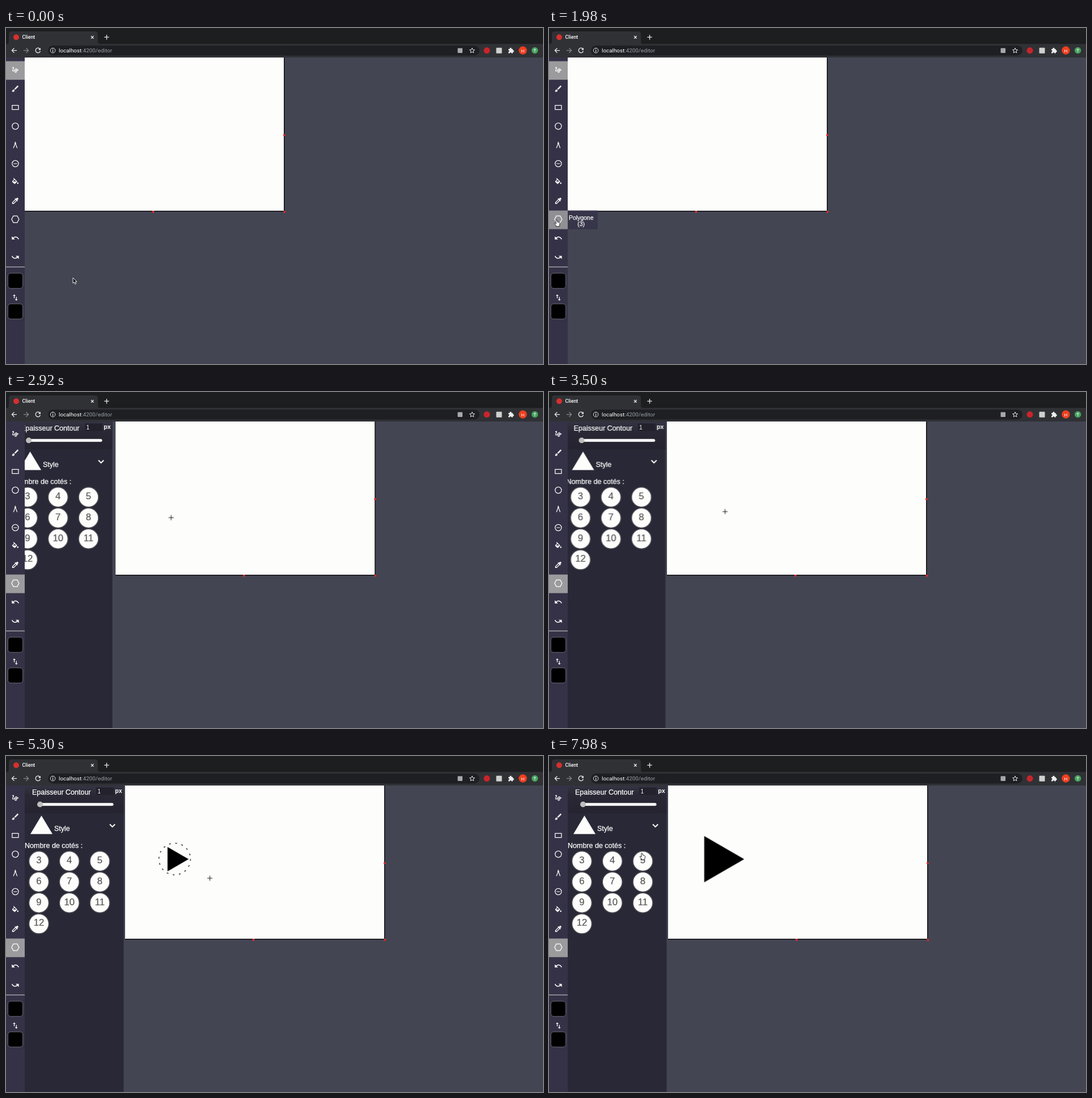
An HTML page that plays this animation: 947 by 592 pixels, repeating every 8000 ms.

```html
<!DOCTYPE html>
<html lang="fr">
<head>
<meta charset="utf-8">
<title>Client</title>
<style>
  html, body { margin: 0; width: 100%; height: 100%; overflow: hidden; background: #434553; }
  svg { display: block; width: 100%; height: 100%; }
  text { font-family: "Liberation Sans", Arial, sans-serif; fill: #fff; }
  .ui { font-family: Roboto, sans-serif; }
  .line { fill: none; stroke: #fff; stroke-width: 2; }
  .chrome { fill: none; stroke: #e8eaed; stroke-width: 1.3; }
  .thin { stroke-width: 1; }
  .off { stroke: #85878a; }
  .label, .tip { stroke: #fff; stroke-width: .25; }
  .label { font-size: 12.5px; }
  .side { font-size: 16.7px; fill: #555; stroke: #555; stroke-width: .2; text-anchor: middle; }
  .tip { font-size: 10.45px; text-anchor: middle; }
</style>
</head>
<body>
<svg viewBox="0 0 947 592" preserveAspectRatio="none">
  <defs>
    <linearGradient id="head" x2="0" y2="1">
      <stop stop-color="#353443"/><stop offset=".35" stop-color="#292834"/><stop offset="1" stop-color="#24232f"/>
    </linearGradient>
  </defs>
  <rect width="947" height="592" fill="#434553"/>

  <g id="canvas">
    <rect x="33" y="52" width="457" height="270" fill="#fdfdfc"/>
    <path d="M33 322.6H490.600V52" fill="none" stroke="#000" stroke-width="1.3"/>
    <path d="M489 187h3.4v3.4h-3.4zM257.8 322h3.4v3.4h-3.4zM489.5 322h3.4v3.4h-3.4z" fill="#e02c2c"/>
  </g>

  <path id="shape" d="M1 0L-.5 .866V-.866z"/>
  <circle id="ring" cx="297.5" cy="181.5" fill="none" stroke="#555" stroke-width="1.8" stroke-dasharray="3.2 7.8"/>

  <g id="panel">
    <rect x="-10" y="52" width="217.5" height="540" fill="#292836"/>
    <rect x="-10" y="52" width="217.5" height="49" fill="url(#head)"/>
    <rect x="159" y="55.5" width="31" height="13" fill="#22212c"/>
    <text class="label" x="46" y="67.5">Epaisseur Contour</text>
    <text x="161.5" y="65.5" font-size="10">1</text>
    <text x="192.3" y="64.8" font-size="10.7" font-weight="bold">px</text>
    <rect x="57" y="82.7" width="132.5" height="5" rx="2.5" fill="#fdfdfc"/>
    <circle cx="60" cy="85.2" r="5" fill="#bdbdbd"/>
    <path d="M62.5 105L82 137.5H43z" fill="#fdfdfc"/>
    <text class="label" x="85" y="131.5">Style</text>
    <path class="line" d="M183 120.3l4.6 4.6 4.6-4.6"/>
    <text class="label" x="33" y="161.7">Nombre de cotés :</text>
  </g>

  <g id="tooltip">
    <rect x="-20" y="321.5" width="105.8" height="33" fill="#373549"/>
    <text class="tip" x="56.7" y="337.6">Polygone</text>
    <text class="tip" x="56.7" y="349.4">(3)</text>
  </g>

  <rect y="52" width="33" height="540" fill="#353247"/>
  <rect id="firstTool" y="58.5" width="33" height="32.7" fill="#9b9a9d"/>
  <rect id="polygonTool" y="321.6" width="33" height="32.8" fill="#9b9a9d"/>
  <g id="tools"></g>
  <path d="M0 421H33" stroke="#d8d8d8" stroke-width="1.2"/>
  <g stroke="#6c6a78">
    <rect x="3.3" y="432" width="26.4" height="26.8" rx="5"/>
    <rect x="3.3" y="486" width="26.4" height="26.8" rx="5"/>
  </g>

  <rect width="947" height="28" fill="#1c1e20"/>
  <rect y="28" width="947" height="24" fill="#303135"/>
  <path d="M1 28q4 0 4-4V11q0-5 5-5h147q5 0 5 5v13q0 4 4 4z" fill="#303135"/>
  <rect x="74" y="31" width="761" height="17.4" rx="8.7" fill="#1d1f22"/>
  <circle cx="18" cy="16.2" r="5" fill="#d5302f"/>
  <text class="ui" x="28.5" y="19.4" font-size="8.8" font-weight="500">Client</text>
  <path class="chrome" d="M150 14l4.6 4.6M154.6 14l-4.6 4.6M173.3 16.2h8.4M177.5 12v8.4"/>
  <path class="chrome" d="M19 39.6h-8.5M14.5 35.5l-4.1 4.1 4.1 4.1"/>
  <path class="chrome off" d="M31 39.6h8.5M35.5 35.5l4.1 4.1-4.1 4.1"/>
  <path class="chrome" d="M60 37.2a4.2 4.2 0 1 0 .5 3.3"/>
  <path d="M61 34.8v4h-4z" fill="#e8eaed"/>
  <circle class="chrome thin" cx="82.6" cy="39.6" r="4.3"/>
  <path class="chrome" d="M82.6 39v3.2M82.6 36.8v1.2"/>
  <text class="ui" x="93" y="43" font-size="9.85">localhost<tspan fill="#9aa0a6">:4200/editor</tspan></text>
  <rect x="796.5" y="35.5" width="8.5" height="8.5" rx="1" fill="#a5a8ac"/>
  <path class="chrome thin" d="M822 35.3l1.3 2.9 3.2.3-2.4 2.1.7 3.1-2.8-1.6-2.8 1.6.7-3.1-2.4-2.1 3.2-.3z"/>
  <circle cx="848" cy="39.6" r="5.5" fill="#c9242c"/>
  <rect x="864.5" y="34.7" width="10" height="10" rx="1" fill="#cfd0cf"/>
  <path d="M886 37h2.3a1.7 1.7 0 1 1 3.2 0h2.3v2.3a1.6 1.6 0 1 1 0 3.1v2.1h-2.4a1.5 1.5 0 0 0-3 0H886v-2.4a1.5 1.5 0 0 0 0-3z" fill="#eceef0"/>
  <circle cx="911.4" cy="39.5" r="7.2" fill="#ee3f1f"/>
  <text class="ui" x="911.4" y="42.5" font-size="8" text-anchor="middle">H</text>
  <circle cx="932.6" cy="39.5" r="5.7" fill="#43a35e"/>
  <path class="chrome thin" d="M932.6 42.5v-5.5M930.2 39l2.4-2.4 2.4 2.4"/>

  <g id="cursor">
    <path id="arrow" d="M0 0v9.7l2.2-2 1.7 3.7 1.7-.8-1.6-3.5h3z" fill="#111" stroke="#fff" stroke-width=".9"/>
    <path id="hand" d="M-1.2 .6q1.2-1.4 2 .2l.8 3 3 .8q1.3.5 1 2l-.8 3.6v1.6H-.8v-1.5L-3.6 6.9q-.5-1.3 1-1.3l1.7 1.2z" fill="#fff" stroke="#111" stroke-width=".9"/>
    <path id="cross" d="M-4.5 0h9M0-4.5v9" stroke="#111" stroke-width="1"/>
  </g>
</svg>
<script>
const LOOP = 8000;
const $ = id => document.getElementById(id);
const NS = 'http://www.w3.org/2000/svg';

function add(parent, tag, attrs, text = '') {
  const el = parent.appendChild(document.createElementNS(NS, tag));
  for (const key in attrs) el.setAttribute(key, attrs[key]);
  el.textContent = text;
  return el;
}

const CIRCLE = 'M3 12a9 9 0 1 1 18 0a9 9 0 1 1-18 0z';
const UNDO = 'M12.5 8c-2.65 0-5.05.99-6.9 2.6L2 7v9h9l-3.62-3.62c1.39-1.16 3.16-1.88 5.12-1.88 3.54 0 6.55 2.31 7.6 5.5l2.37-.78C21.08 11.03 17.15 8 12.5 8z';

// Toolbar icons on a 24-unit grid: [centre y, path, class, extra transform]
const icons = [
  [74, 'M3.5 6c2-2 4.5-2.5 3.5.8s-4.3 6-2 8 5-3 7-5 5.2-1.8 5.2 1-1.8 8-4.2 8-3-3.6 0-5.4 5-1.7 8.5-1.7', 'line'],
  [107, 'M7 14c-1.66 0-3 1.34-3 3 0 1.31-1.16 2-2 2 .92 1.22 2.49 2 4 2 2.21 0 4-1.79 4-4 0-1.66-1.34-3-3-3zm13.71-9.37l-1.34-1.34a1 1 0 0 0-1.41 0L9 12.25 11.75 15l8.96-8.96a1 1 0 0 0 0-1.41z'],
  [140, 'M3 6h18v12H3z', 'line'],
  [173, CIRCLE, 'line'],
  [206, 'M12 3v3M12 6a1.6 1.6 0 1 1 0 3.2a1.6 1.6 0 1 1 0-3.2M11.3 9L6.8 21M12.7 9l4.5 12', 'line'],
  [239, CIRCLE + 'M7 12h10', 'line'],
  [270.5, 'M16.56 8.94L7.62 0 6.21 1.41l2.38 2.38-5.15 5.15c-.59.59-.59 1.54 0 2.12l5.5 5.5c.29.29.68.44 1.06.44s.77-.15 1.06-.44l5.5-5.5c.59-.58.59-1.53 0-2.12zM5.21 10L10 5.21 14.79 10zM19 11.5s-2 2.17-2 3.5c0 1.1.9 2 2 2s2-.9 2-2c0-1.33-2-3.5-2-3.5z', '', 'translate(0 2)'],
  [304.5, 'M20.71 5.63l-2.34-2.34a1 1 0 0 0-1.41 0l-3.12 3.12-1.93-1.91-1.41 1.41 1.42 1.42L3 16.25V21h4.75l8.92-8.92 1.42 1.42 1.41-1.41-1.92-1.92 3.12-3.12c.4-.4.4-1.03.01-1.42zM6.92 19L5 17.08l8.06-8.06 1.92 1.92z'],
  [337, 'M1.5 12l5-9.3h11l5 9.3-5 9.3h-11z', 'line'],
  [370, UNDO],
  [404, UNDO, '', 'rotate(180 12 12)'],
  [475, 'M9 3L5 6.99h3V14h2V6.99h3zM16 17.01V10h-2v7.01h-3L15 21l4-3.99z'],
];
for (const [y, d, kind = '', extra = ''] of icons) {
  add($('tools'), 'path', {
    d, class: kind, fill: '#fff',
    transform: `translate(16.4 ${y}) scale(.62) translate(-12 -12) ${extra}`,
  });
}

// Side-count buttons
for (let n = 3; n <= 12; n++) {
  const x = 58 + (n % 3) * 53.75, y = 185.2 + (Math.floor(n / 3) - 1) * 36.8;
  add($('panel'), 'circle', { cx: x, cy: y, r: 17.4, fill: '#fdfdfc', stroke: '#525157', 'stroke-width': 1.4 });
  add($('panel'), 'text', { class: 'side', x, y: y + 3.8 }, n);
}

// steps: [time, value, easing towards the next step]
function play(id, prop, steps, format = v => v) {
  const all = [[0, steps[0][1]], ...steps, [LOOP, steps.at(-1)[1]]];
  $(id).animate(
    all.map(([t, v, easing = 'linear']) => ({ offset: t / LOOP, [prop]: format(v), easing })),
    { duration: LOOP, iterations: Infinity });
}
const shift = x => `translate(${x}px, 0px)`;
const at = ([x, y]) => `translate(${x}px, ${y}px)`;
const HOLD = 'steps(1, end)';
const SWIFT = 'cubic-bezier(.25, .8, .25, 1)';
const show = (id, ...steps) => play(id, 'opacity', steps.map(([t, v]) => [t, v, HOLD]));

play('canvas', 'transform', [[2078, 0, SWIFT], [4005, 177]], shift);
play('panel', 'transform', [[2156, -175, SWIFT], [4036, 0]], shift);
play('tooltip', 'transform', [[960, -53, SWIFT], [1310, 0], [2480, 0, 'ease-in'], [2800, -53]], shift);
play('firstTool', 'opacity', [[2080, 1, 'ease-out'], [2520, 0]]);
play('polygonTool', 'opacity', [[960, 0], [1120, 0.9], [2080, 0.9], [2300, 1]]);

play('shape', 'transform', [[4880, 0], [5300, 24.7], [5700, 47]],
  r => `translate(297.2px, 181.7px) scale(${r})`);
play('ring', 'r', [[4880, 0], [5300, 27.8], [5700, 50]], r => r + 'px');
show('ring', [0, 0], [4880, 1], [5760, 0]);

play('cursor', 'transform', [
  [250, [118, 440], 'ease-in'], [840, [92, 418]], [1020, [18, 346], 'ease-out'], [1120, [13.5, 338]],
  [2090, [13.5, 338], 'ease-in-out'], [2400, [202.5, 258.7], 'ease-out'], [2900, [290, 222], 'ease-out'],
  [3500, [310.5, 210.7], 'ease-in-out'], [4300, [297.5, 182]], [4850, [297.5, 182]],
  [5300, [359.3, 215.3]], [5700, [392, 233]], [5860, [392, 233], 'ease-in-out'],
  [6600, [152, 177], 'ease-out'], [6880, [141.5, 170.7]], [7350, [141.5, 170.7], 'ease-in-out'],
  [7800, [164, 171]],
], at);
show('arrow', [0, 1], [990, 0], [2130, 1], [2290, 0], [6430, 1], [7600, 0]);
show('hand', [0, 0], [990, 1], [2130, 0], [7600, 1]);
show('cross', [0, 0], [2290, 1], [6430, 0]);
</script>
</body>
</html>
```
